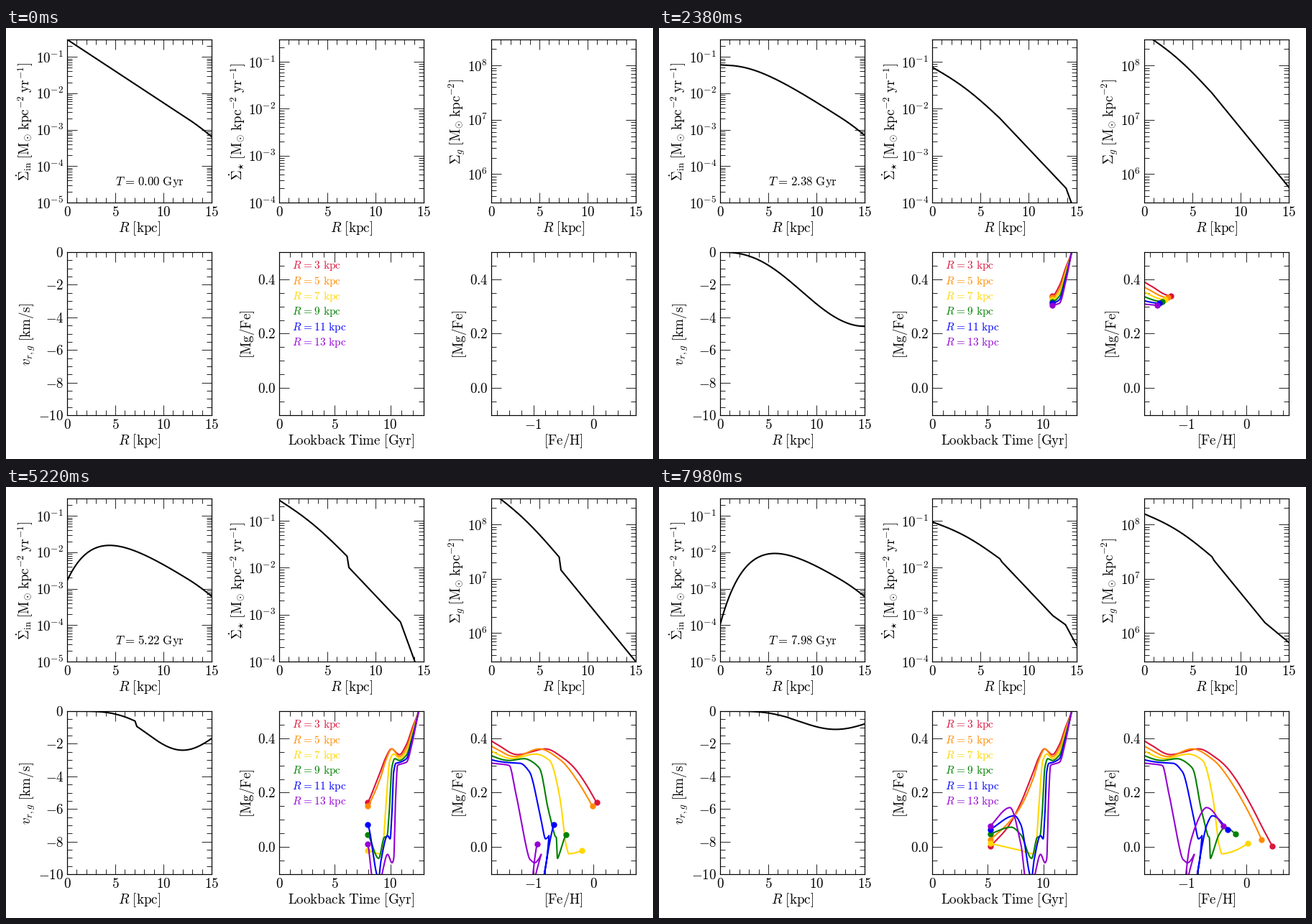
A matplotlib script that plays this animation: 900 px wide and 600 px high, repeating every 8 s.

```python
import numpy as np
import matplotlib.pyplot as plt
from matplotlib.animation import FuncAnimation
from matplotlib.ticker import FuncFormatter, MultipleLocator, NullFormatter

W, H, DPI = 900, 600, 100
FRAMES, STEP = 400, 20
AGE = 13.2                      # lookback time at T = 0
TIMES = np.arange(FRAMES) * 0.02
R = np.linspace(0, 15, 401)
plt.rcParams.update({"mathtext.fontset": "cm", "font.family": "DejaVu Serif",
                     "axes.linewidth": 0.8})


def ramp(t, a, b):
    return np.clip((t - a) / (b - a), 0, 1)


# ---- radial profiles ----
def infall_rate(t):
    """Exponential disc that fades from the inside out, plus a brief burst."""
    disc = np.exp(-R / 2.5)
    burst = 0.13 * np.exp(-0.5 * ((t - 3.21) / 0.5) ** 2)
    rate = disc * (0.3 * np.exp(-t * np.exp(-R / 3)) + burst)
    return rate * 10 ** (-0.01 * np.maximum(R - 12.5, 0) ** 2)


def front(t):
    """Which radii lie behind the inward front (stalls near 7 kpc), its depth."""
    edge = max(15 - 7.4 * (t - 2.42), 7.05)
    depth = 0.53 * ramp(t, 2.42, 2.6) * np.exp(-max(t - 4.04, 0) / 1.2)
    return edge, ramp(R, edge, edge + 0.18), depth


def log_gas(t):
    _, behind, depth = front(t)
    level = 7.17 + 0.87 * np.log10(min(t, 2.4)) - 0.09 * ramp(t, 2.4, 4.04)
    slope = np.interp(t, [1.18, 2.38, 4.04, 7.98], [0.17, 0.155, 0.194, 0.112])
    inner = slope * (7 - R) + 0.08 * np.sin(np.pi * R / 7)
    outer = 0.217 * (7 - R) + 0.07 * ramp(t, 5.22, 6.42) * np.maximum(R - 12.5, 0)
    return level + np.where(R < 7, inner, outer) - depth * behind


def log_stars(t):
    """Linear in gas, but steeper below 1e6 solar masses per square kpc."""
    gas = log_gas(t)
    rate = np.interp(t, [0, 1.18, 3.6, 7.98], [-10.82, -10.26, -9.12, -9.215])
    return gas + rate + 1.6 * np.minimum(gas - 6, 0)


def flow_speed(t):
    edge, behind, depth = front(t)
    epochs = [1.18, 2.38, 4.2, 5.22]
    peak = np.interp(t, epochs, [11.4, 15, 15, 12])
    power = np.interp(t, epochs, [2, 2.5, 2.5, 4.5])
    if t < 1.18:
        speed = 2.6 / t
    elif t < 4:
        speed = np.interp(t, [1.18, 2.38], [2.2, 4.55])
    else:
        speed = min(4.55, 5.8 / (t - 2.8))
    settled = ramp(t, 4.2, 5.22)
    calm = 1 - 1.5 * depth * settled * (1 - behind)
    flow = -speed * calm * np.sin(np.pi * R / (2 * peak)) ** power
    fast = -5.3 - 2.35 * (R - edge)
    return flow + behind * (1 - settled) ** 2 * (fast - flow)


# ---- abundance tracks ----
def spline(x, y, q):
    """Monotone cubic through the points (x, y), evaluated at q."""
    x, y = np.asarray(x, float), np.asarray(y, float)
    h = np.diff(x)
    s = np.diff(y) / h
    m = np.concatenate([s[:1], np.zeros(len(s) - 1), s[-1:]])
    for i in range(1, len(s)):
        if s[i - 1] * s[i] > 0:
            m[i] = 2 * s[i - 1] * s[i] / (s[i - 1] + s[i])
    i = np.clip(np.searchsorted(x, q) - 1, 0, len(h) - 1)
    u = (q - x[i]) / h[i]
    return (y[i] * (1 + 2 * u) * (1 - u) ** 2 + y[i + 1] * u * u * (3 - 2 * u)
            + h[i] * (m[i] * u * (1 - u) ** 2 + m[i + 1] * u * u * (u - 1)))


def track(radius, color, *late):
    """Shared early descent, then key points (time, [Fe/H], [Mg/Fe])."""
    s = (radius - 3) / 10
    early = [(0, -4, 0.62), (0.65, -2.6, 0.5),
             (1.18, -2.05 - 0.1 * s, 0.443 - 0.05 * s),
             (1.75, -1.6 - 0.2 * s, 0.377 - 0.065 * s),
             (2.38, -1.26 - 0.23 * s, 0.34 - 0.036 * s)]
    t, fe, mg = zip(*early, *late)
    return radius, color, spline(t, fe, TIMES), spline(t, mg, TIMES)


TRACKS = [
    track(3, "crimson", (3.1, -.8, .361), (3.6, -.52, .33), (4.04, -.29, .283),
          (5.22, .05, .163), (6.42, .26, .072), (7.98, .43, .002)),
    track(5, "darkorange", (3.05, -.9, .361), (3.6, -.55, .32),
          (4.04, -.32, .26), (5.22, -.02, .15), (6.42, .13, .085),
          (7.98, .25, .027)),
    track(7, "gold", (2.9, -.97, .342), (3.25, -.73, .318), (3.55, -.56, .18),
          (3.85, -.46, .01), (4.1, -.41, -.025), (5.22, -.19, -.013),
          (7.98, .02, .013)),
    track(9, "green", (2.8, -1.15, .325), (3.07, -.9, .29), (3.27, -.76, .145),
          (3.5, -.64, .04), (3.75, -.62, .035), (4.25, -.6, -.042),
          (5.22, -.46, .045), (6.1, -.36, .073), (7.98, -.18, .048)),
    track(11, "blue", (2.7, -1.22, .308), (2.9, -1.06, .275), (3.05, -.9, .13),
          (3.22, -.8, .03), (3.45, -.74, .042), (4.04, -.78, -.05),
          (4.25, -.83, -.115), (5.22, -.66, .082), (5.8, -.57, .115),
          (7.98, -.31, .064)),
    track(13, "darkviolet", (2.55, -1.4, .3), (2.72, -1.28, .185),
          (2.9, -1.06, -.045), (3.05, -.98, -.058), (3.45, -.87, -.027),
          (3.95, -.96, -.1), (4.5, -1.05, -.2), (5.22, -.94, .01),
          (6.2, -.67, .145), (7.98, -.39, .077)),
]

# ---- panels ----
fig = plt.figure(figsize=(W / DPI, H / DPI), dpi=DPI, facecolor="white")
LABEL = 13.7
EQUALS = r"\hspace{0.08}=\hspace{0.08}"


def place(x, y, s, size, **kw):
    return fig.text(x / W, 1 - y / H, s, fontsize=size, va="baseline", **kw)


def panel(col, row, xlim, ylim, xname, yname, yname_x, xstep, ystep=None, digits=0):
    left, top = 85 + 295 * col, 16 + 296 * row
    ax = fig.add_axes([left / W, 1 - (top + 227) / H, 201 / W, 227 / H])
    ax.set(xlim=xlim, ylim=ylim)
    ax.xaxis.set_major_locator(MultipleLocator(xstep))
    ax.xaxis.set_minor_locator(MultipleLocator(xstep / 5))
    ax.xaxis.set_major_formatter(FuncFormatter(lambda v, _: f"${v:.0f}$"))
    if ystep:
        ax.yaxis.set_major_locator(MultipleLocator(ystep))
        ax.yaxis.set_minor_locator(MultipleLocator(ystep / 4))
        ax.yaxis.set_major_formatter(
            FuncFormatter(lambda v, _: f"${v + 0.0:.{digits}f}$"))
    else:
        ax.set_yscale("log")
        ax.set_ylim(ylim)
        ax.yaxis.set_major_formatter(
            FuncFormatter(lambda v, _: f"$10^{{{round(np.log10(v))}}}$"))
        ax.yaxis.set_minor_formatter(NullFormatter())
    ax.tick_params(which="both", direction="in", top=True, right=True, width=0.6)
    ax.tick_params(which="major", length=10, labelsize=LABEL)
    ax.tick_params(which="minor", length=5)
    place(left + 100.5, top + 268, xname, LABEL, ha="center")
    place(yname_x, top + 114, yname, LABEL, ha="center", rotation=90,
          rotation_mode="anchor")
    return ax


RADIUS = r"$R\ \mathrm{[kpc]}$"
RATE = r"\;\mathrm{[M}_{\odot}\;\mathrm{kpc}^{-2}\;\mathrm{yr}^{-1}\mathrm{]}$"
MGFE = r"$\mathrm{[Mg/Fe]}$"
axes = [
    panel(0, 0, (0, 15), (1e-5, 0.3), RADIUS,
          r"$\dot{\Sigma}_\mathrm{in}" + RATE, 33, 5),
    panel(1, 0, (0, 15), (1e-4, 0.3), RADIUS,
          r"$\dot{\Sigma}_{\star}" + RATE, 329, 5),
    panel(2, 0, (0, 15), (3e5, 3e8), RADIUS,
          r"$\Sigma_g\;\mathrm{[M}_{\odot}\;\mathrm{kpc}^{-2}\mathrm{]}$", 633, 5),
    panel(0, 1, (0, 15), (-10, 0), RADIUS,
          r"$v_{r,g}\ \mathrm{[km/s]}$", 35, 5, 2),
    panel(1, 1, (0, 13), (-0.1, 0.5), r"$\mathrm{Lookback\ Time\ [Gyr]}$",
          MGFE, 341, 5, 0.2, 1),
    panel(2, 1, (-1.7, 0.7), (-0.1, 0.5), r"$\mathrm{[Fe/H]}$",
          MGFE, 636, 1, 0.2, 1),
]
for i, (radius, color, *_) in enumerate(TRACKS):
    place(398, 335.5 + 21.3 * i, rf"$R{EQUALS}{radius}\ \mathrm{{kpc}}$", 11,
          color=color)

# Bake the fixed parts into one backdrop so that frames draw quickly.
fig.canvas.draw()
backdrop = np.array(fig.canvas.buffer_rgba())
for label in list(fig.texts):
    label.remove()
for ax in axes:
    ax.patch.set_visible(False)
    ax.xaxis.set_visible(False)
    ax.yaxis.set_visible(False)
fig.figimage(backdrop, zorder=-5)

# ---- moving parts ----
lines = [ax.plot([], [], color="black", lw=1.5)[0] for ax in axes[:4]]
trails, dots = [], []
for _, color, *_ in TRACKS:
    for ax in axes[4:]:
        trails.append(ax.plot([], [], color=color, lw=1.5)[0])
        dots.append(ax.plot([], [], "o", color=color, ms=5)[0])
clock = axes[0].text(5, 3e-5, "", fontsize=12.1, va="baseline")


def draw(i):
    t = TIMES[i]
    clock.set_text(rf"$T{EQUALS}{t:.2f}\ \mathrm{{Gyr}}$")
    lines[0].set_data(R, infall_rate(t))
    if i == 0:
        for item in lines[1:] + trails + dots:
            item.set_data([], [])
    else:
        lines[1].set_data(R, 10 ** log_stars(t))
        lines[2].set_data(R, 10 ** log_gas(t))
        lines[3].set_data(R, flow_speed(t))
        for k, (_, _, fe, mg) in enumerate(TRACKS):
            for j, x in enumerate((AGE - TIMES, fe)):
                trails[2 * k + j].set_data(x[:i + 1], mg[:i + 1])
                dots[2 * k + j].set_data(x[i:i + 1], mg[i:i + 1])
    return lines + trails + dots + [clock]


anim = FuncAnimation(fig, draw, frames=FRAMES, interval=STEP, repeat=True,
                     repeat_delay=0, blit=False)
plt.show()
```
